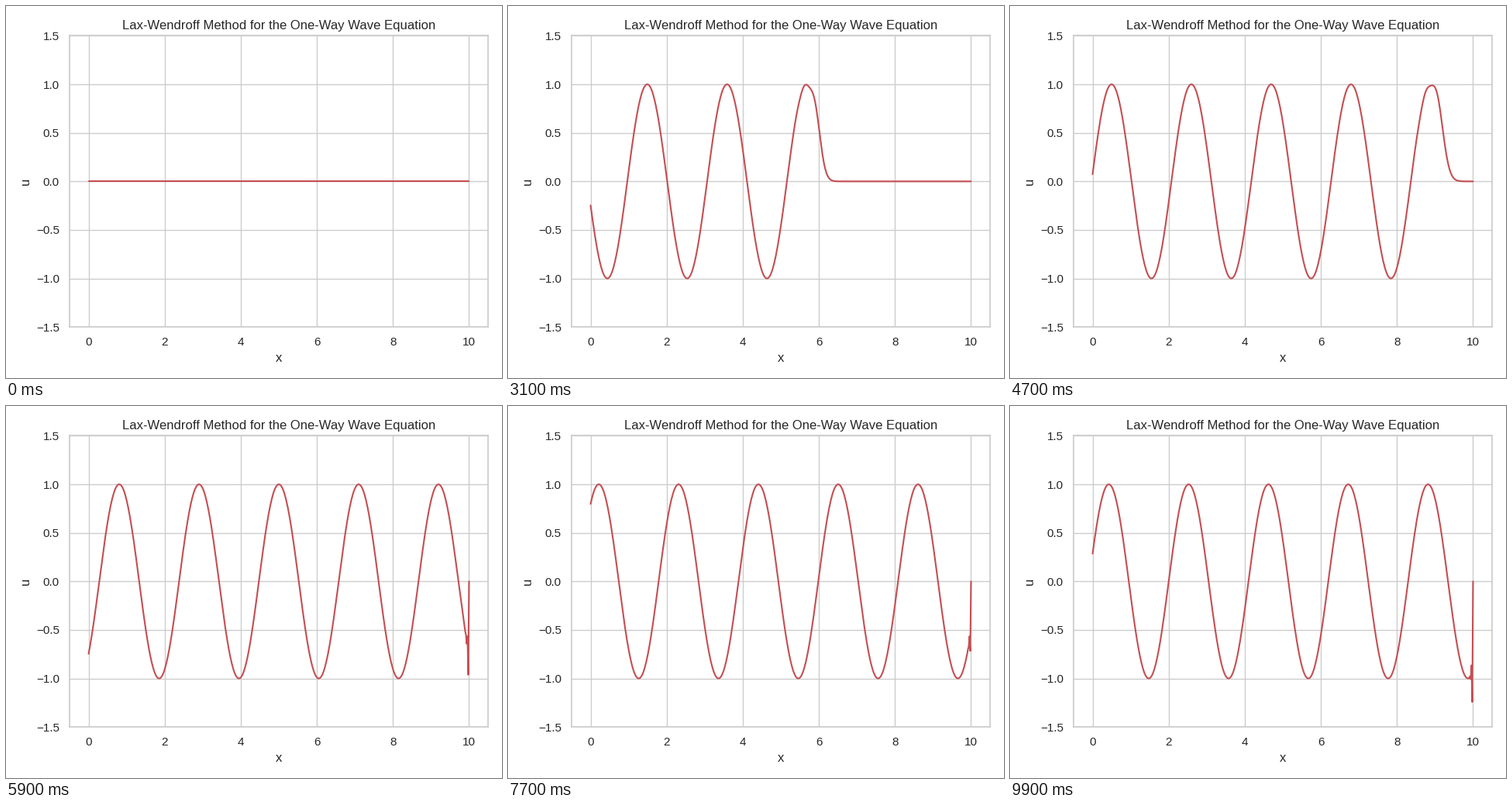
A matplotlib script that plays this animation: 640 px wide and 480 px high, repeating every 10000 ms.

```python
import numpy as np
import matplotlib.pyplot as plt
from matplotlib.animation import FuncAnimation

W, H, DPI = 640, 480, 100
FRAMES, INTERVAL = 100, 100

INK, GRID, RED = "0.15", "0.8", "#C44E52"

plt.rcParams.update({
    "font.family": "Liberation Sans",
    "font.size": 12,
    "axes.titlesize": 12,
    "axes.labelsize": 12,
    "xtick.labelsize": 11,
    "ytick.labelsize": 11,
    "text.color": INK,
    "axes.labelcolor": INK,
    "xtick.color": INK,
    "ytick.color": INK,
    "axes.edgecolor": GRID,
    "axes.linewidth": 1.25,
    "axes.grid": True,
    "axes.axisbelow": True,
    "grid.color": GRID,
    "grid.linewidth": 1,
    "xtick.major.size": 6,
    "ytick.major.size": 6,
    "xtick.bottom": False,
    "ytick.left": False,
    "lines.linewidth": 1.5,
    "lines.solid_capstyle": "round",
})

# One-way wave equation u_t + c u_x = 0, driven at the left end
LENGTH, POINTS = 10, 500
C, DT, STEPS = 1.0, 0.01, 20
DX = LENGTH / POINTS
NU = C * DT / DX
x = np.linspace(0, LENGTH, POINTS)


def lax_wendroff(u, t):
    """Advance u by one step; the right end stays fixed at zero."""
    left, mid, right = u[:-2], u[1:-1], u[2:]
    new = u.copy()
    new[1:-1] = (mid - NU / 2 * (right - left)
                 + NU ** 2 / 2 * (right - 2 * mid + left))
    new[0] = np.sin(3 * t)
    return new


def solve():
    u = np.zeros(POINTS)
    states = [u]
    for n in range(1, (FRAMES - 1) * STEPS + 1):
        u = lax_wendroff(u, n * DT)
        if n % STEPS == 0:
            states.append(u)
    return states


states = solve()

fig = plt.figure(figsize=(W / DPI, H / DPI), dpi=DPI, facecolor="white")
x0, x1, y0, y1 = 82, 622, 38.4, 414.2
ax = fig.add_axes([x0 / W, 1 - y1 / H, (x1 - x0) / W, (y1 - y0) / H])
ax.set(xlim=(-0.5, 10.5), ylim=(-1.5, 1.5), xlabel="x", ylabel="u",
       title="Lax-Wendroff Method for the One-Way Wave Equation")
line, = ax.plot(x, states[0], color=RED)


def update(i):
    line.set_ydata(states[i])
    return line,


anim = FuncAnimation(fig, update, frames=FRAMES, interval=INTERVAL,
                     repeat=True, repeat_delay=0)
plt.show()
```
